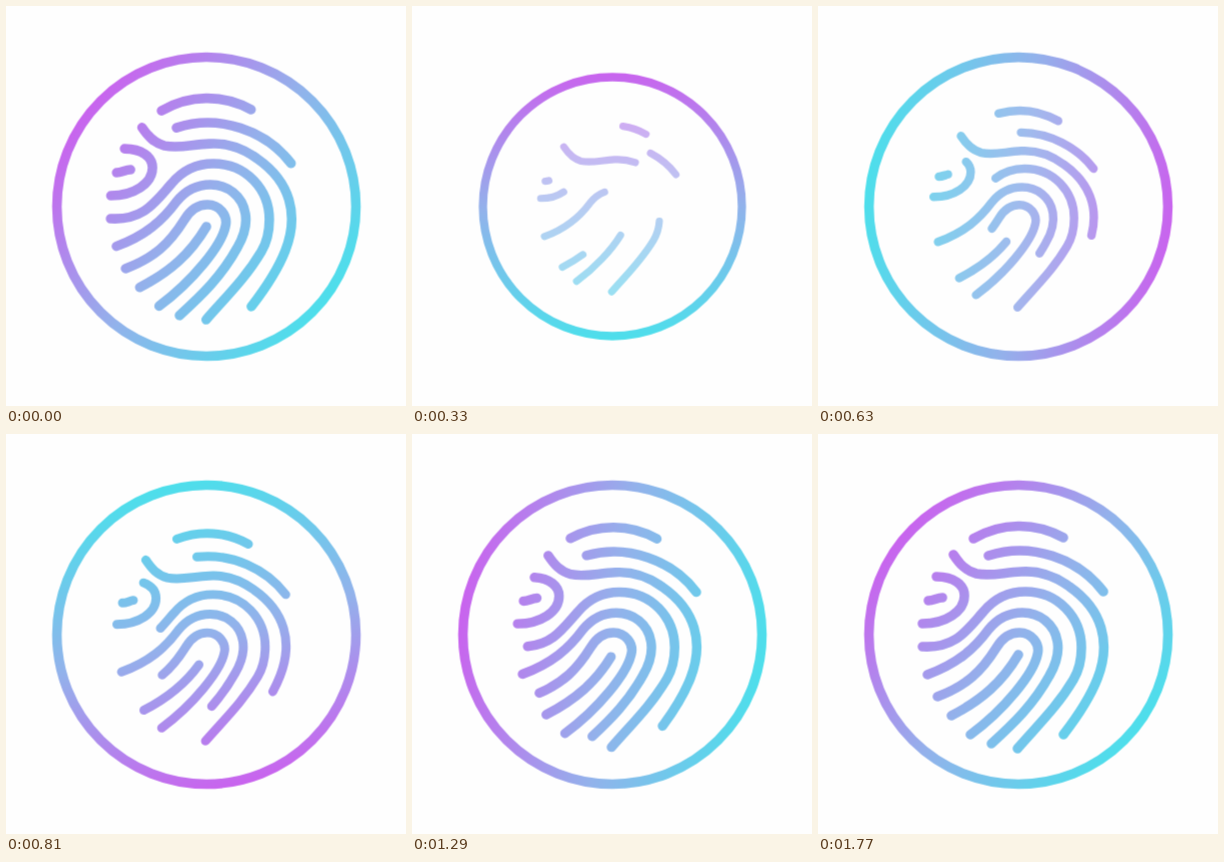
An HTML page for the animation above (3.8 s loop, 400 by 400 pixels).

```html
<!DOCTYPE html>
<html lang="en">
<head>
<meta charset="utf-8">
<title>Fingerprint</title>
<style>
  html, body { margin: 0; width: 100%; height: 100%; overflow: hidden; background: #fefefe; }
  svg { display: block; width: 100%; height: 100%; }

  .pulse, .spin, .print { transform-origin: 200px 200px; }
  .pulse { animation: pulse 3.8s infinite; }
  .spin { animation: spin 3.8s infinite; }
  .print { animation: shrink 3.8s infinite, fade 3.8s infinite; }
  .print path { stroke-dasharray: 1 1; animation: redraw 3.8s infinite; }
  .lines { fill: none; stroke: #fff; stroke-width: 9.6; stroke-linecap: round; }

  /* Motion fills the first 1.8s, then the finished mark holds. */
  @keyframes pulse {
    0% { transform: scale(1); animation-timing-function: ease-in-out; }
    6.05% { transform: scale(.848); animation-timing-function: ease-in-out; }
    17.1%, 100% { transform: scale(1); }
  }
  @keyframes spin {
    0% { transform: rotate(218deg); animation-timing-function: cubic-bezier(.4, .15, .4, 1); }
    47.37%, 100% { transform: rotate(578deg); }
  }
  @keyframes shrink {
    0% { transform: scale(1); animation-timing-function: ease-out; }
    7.89% { transform: scale(.735); animation-timing-function: cubic-bezier(.2, .42, .2, 1); }
    47.37%, 100% { transform: scale(1); }
  }
  @keyframes fade {
    0% { opacity: 1; animation-timing-function: ease-in; }
    8.4% { opacity: .65; animation-timing-function: linear; }
    21%, 100% { opacity: 1; }
  }
  /* Erase toward each line's start, then draw back from its end. */
  @keyframes redraw {
    0% { stroke-dashoffset: 0; animation-timing-function: cubic-bezier(.2, .55, 0, 1); }
    47.37%, 100% { stroke-dashoffset: 2; }
  }
</style>
</head>
<body>
<svg viewBox="-.4 -.6 400 400">
  <defs>
    <linearGradient id="tint" gradientUnits="userSpaceOnUse" x1="354" y1="200" x2="46" y2="200">
      <stop offset="0" stop-color="#c964ee"/>
      <stop offset=".5" stop-color="#93b2eb"/>
      <stop offset="1" stop-color="#4ddfeb"/>
    </linearGradient>
    <mask id="mark" maskUnits="userSpaceOnUse" x="0" y="0" width="400" height="400">
      <g class="lines">
        <circle class="pulse" cx="200" cy="200" r="149.5"/>
        <g class="print">
          <path pathLength="1" d="M155 104A90 90 0 0 1 245 103"/>
          <path pathLength="1" d="M170 121C213 107 260 124 285 157"/>
          <path pathLength="1" d="M245 300C262 278 272 262 279 244C293 208 284 175 251 152C236 141 219 136 203 137C184 138 172 142 158 139C147 136 141 129 135 120"/>
          <path pathLength="1" d="M104 212C137 214 148 196 165 177C175 165 188 157 207 157C240 157 263 183 263 213C263 226 261 235 255 245C239 272 219 291 199 314"/>
          <path pathLength="1" d="M173 309C195 289 215 270 231 241C238 229 241 219 239 207C236 189 221 178 204 178C190 178 179 184 170 195C156 214 139 229 109 240"/>
          <path pathLength="1" d="M119 262C148 251 163 237 178 213C184 203 191 198 201 198C213 198 222 209 219 220C215 239 186 275 152 300"/>
          <path pathLength="1" d="M200 220C184 247 164 265 133 281"/>
          <path pathLength="1" d="M118 142C135 142 146 150 146 161C146 177 127 189 104 189"/>
          <path pathLength="1" d="M124 163C119 163 115 166 110 166"/>
        </g>
      </g>
    </mask>
  </defs>
  <g mask="url(#mark)">
    <g class="pulse">
      <rect class="spin" x="-200" y="-200" width="800" height="800" fill="url(#tint)"/>
    </g>
  </g>
</svg>
</body>
</html>
```
